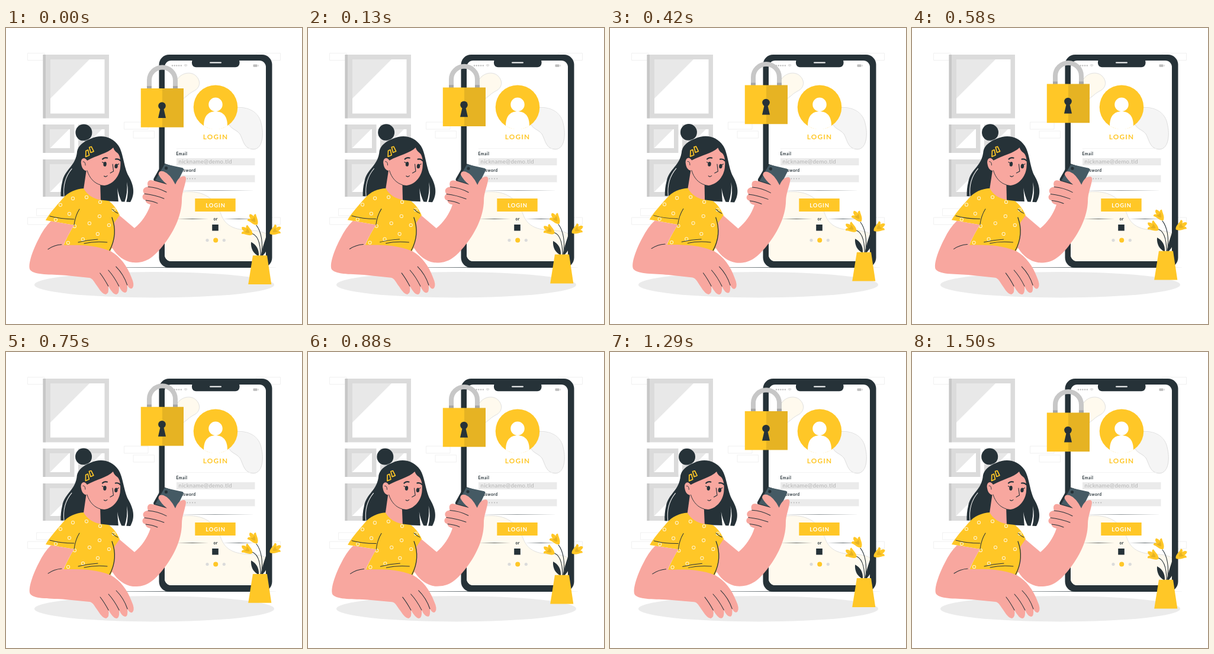
An HTML page with a canvas that plays this animation: 500 by 500 pixels, repeating every 1.54 s.

```html
<!DOCTYPE html>
<html lang="en">
<head>
<meta charset="utf-8">
<title>Login illustration</title>
<style>
  html, body { margin: 0; width: 100%; height: 100%; overflow: hidden; background: #fff; }
  canvas { display: block; width: 500px; height: 500px; }
</style>
</head>
<body>
<canvas id="stage"></canvas>
<script>
const LOOP = 1540, LEAD = 40;
const DARK = '#263238', YELLOW = '#ffc727', SKIN = '#f8a79f', CREAM = '#fffaee';
const canvas = document.getElementById('stage');
const ctx = canvas.getContext('2d');
const density = window.devicePixelRatio || 1;
canvas.width = canvas.height = 500 * density;

function fill(color, path) {
  ctx.fillStyle = color;
  ctx.fill(new Path2D(path));
}

function line(color, width, path) {
  ctx.strokeStyle = color;
  ctx.lineWidth = width;
  ctx.lineCap = ctx.lineJoin = 'round';
  ctx.stroke(new Path2D(path));
}

function rect(color, x, y, w, h, r = 0) {
  ctx.fillStyle = color;
  ctx.beginPath();
  ctx.roundRect(x, y, w, h, r);
  ctx.fill();
}

function ellipse(color, x, y, rx, ry = rx, turn = 0) {
  ctx.fillStyle = color;
  ctx.beginPath();
  ctx.ellipse(x, y, rx, ry, turn, 0, 7);
  ctx.fill();
}

function text(str, x, y, font, color, spacing, align = 'left') {
  ctx.font = font + ' Lato, sans-serif';
  ctx.letterSpacing = spacing + 'px';
  ctx.textAlign = align;
  ctx.fillStyle = color;
  ctx.fillText(str, x, y);
}

// A rule that thins out towards both ends
function rule(x1, x2, y) {
  const mid = (x1 + x2) / 2;
  fill(DARK, `M${x1} ${y}L${mid} ${y - .35}L${x2} ${y}L${mid} ${y + .35}Z`);
}

function brick(x, y, w) {
  ctx.strokeStyle = '#ededed';
  ctx.lineWidth = .8;
  ctx.strokeRect(x, y, w, 12);
}

function pane(x, y, w, h, left, glare) {
  rect('#dbdbdb', x, y, w, h);
  rect('#c7c7c7', x, y, left - 8, h);
  const ix = x + left, iy = y + 8;
  rect('#fff', ix, iy, w - left - 7.5, h - 16);
  fill('#e8e8e8', `M${ix} ${iy}h${glare}L${ix} ${iy + glare}Z`);
}

function drawRoom() {
  brick(37, 42.5, 28);
  brick(200, 159, 40);
  brick(215.5, 174, 35);
  brick(423, 42.5, 40.5);
  brick(52, 305, 40);
  brick(37, 320, 40);
  brick(430, 320, 33.5);
  pane(62.5, 45, 111.5, 107.5, 12.5, 66);
  pane(62.5, 163, 53, 48, 12, 32);
  pane(122, 163, 52, 48, 8, 32);
  pane(62.5, 222, 111.5, 63, 12, 47);
  ellipse('#ebebeb', 250.5, 433.8, 202.5, 21.7);
  rule(100, 462, 404.6);
}

function drawScreen() {
  fill(CREAM, 'M288 88C294 76 312 73 321 81C330 90 328 102 316 107C308 111 302 119 294 122L270 118Z');
  line('#d2d2d2', .7, 'M290 86C297 75 313 73 321 81C330 90 328 102 316 107C308 111 303 119 294 122');
  fill('#f5f5f5', 'M388 137C402 132 424 140 430 158C436 176 435 204 418 205C401 204 401 189 395 179C389 171 377 170 376 160Z');
  line('#cfcfcf', .7, 'M388 135C404 132 424 139 430 157C436 176 435 204 418 205C401 204 401 189 395 179C389 171 377 170 376 160');
  const hill = 'M266 290C282 277 305 274 324 278C347 283 357 299 363 314C369 331 381 339 402 341C418 342 432 342 442 349';
  fill(CREAM, hill + 'V396H266Z');
  line('#d6d6d6', .7, hill);

  ellipse(YELLOW, 354, 133.7, 37.3);
  ellipse('#fff', 354, 129.3, 11.7);
  fill('#fff', 'M334 165.5C334 149 341 141 354 141C367 141 374 149 374 165.5Q354 177 334 165.5Z');
  text('LOGIN', 354, 188.2, 'bold 11.8px', YELLOW, 1.2, 'center');

  rect('#f1f1f1', 288, 203, 132, .8);
  text('Email', 287.5, 215, 'bold 6.8px', DARK, .5);
  text('Password', 287.5, 243.3, 'bold 6.8px', DARK, .5);
  rect('#ebebeb', 288, 220, 132.5, 12);
  rect('#ebebeb', 288, 248.5, 132.5, 12);
  text('nickname@demo.tld', 291.5, 229.3, '9.5px', '#b3b3b3', .35);
  for (let i = 0; i < 7; i++) ellipse('#b3b3b3', 293.5 + i * 4.3, 254.5, .9);
  rule(286, 420, 274.5);

  rect(YELLOW, 319.3, 288, 68.4, 22);
  text('LOGIN', 354, 302.5, 'bold 9.4px', '#fff', .9, 'center');
  rule(288, 342, 322.6);
  rule(367, 420, 322.6);
  text('or', 354, 324.8, 'bold 6.8px', DARK, .4, 'center');
  rect(DARK, 348.2, 332, 10.6, 10.6);
  ellipse('#dbdbdb', 340, 358.5, 2.6);
  ellipse(YELLOW, 354.2, 358.5, 4);
  ellipse('#dbdbdb', 368.3, 358.5, 2.6);
}

function drawPhone() {
  rect(DARK, 258.5, 45, 191, 360, 17);
  ctx.save();
  ctx.beginPath();
  ctx.roundRect(268, 55, 171, 339, 11);
  ctx.clip();
  rect('#fff', 266, 53, 178, 345);
  drawScreen();
  ctx.restore();
  rect(DARK, 314, 50, 80.5, 16.3, 7);
  line('#fff', 2, 'M345 58.5H363');
  for (let i = 0; i < 5; i++) ellipse('#bdbdbd', 281 + i * 3.7, 63.5, 1.2);
  line('#bdbdbd', .9, 'M301 62.8Q303.5 60.4 306 62.8M302.2 64.3Q303.5 63 304.8 64.3');
  rect('#bdbdbd', 417.5, 61.5, 7, 4.2, 1);
  rect('#dbdbdb', 425.5, 62, 1.6, 3);
}

function drawLock() {
  line('#c7c7c7', 8, 'M242 98V89A22 22 0 0 1 286 89V98');
  rect('#a6a6a6', 238, 98.5, 8, 5);
  rect('#a6a6a6', 282, 98.5, 8, 5);
  rect(YELLOW, 227.8, 102.6, 36.2, 65.6);
  rect('#e6b323', 264, 102.6, 36, 65.6);
  ellipse(DARK, 263.5, 132, 6.3);
  fill(DARK, 'M261 135H266L270 152.5H257Z');
}

function flower(x, y, turn) {
  ctx.save();
  ctx.translate(x, y);
  ctx.rotate(turn);
  fill(YELLOW, 'M0 10C-6 7-5 0-9-6Q-6-9-3-5Q-3-11 1-12Q4-9 3.5-5Q6-8 9-6C6 0 6 7 0 10Z');
  fill('#e6b323', 'M-4-4Q0-1 4-4Q3 2 0 4Q-3 2-4-4Z');
  ctx.restore();
}

function drawVase() {
  line(DARK, 1.1, 'M431 386C435 364 431 344 423 334M430 386C430 364 426 349 413 347M433 386C434 366 441 357 447 347');
  fill(DARK, 'M414 362C422 366 428 374 427 386C418 382 413 373 414 362Z');
  fill(DARK, 'M441 346C443 361 440 376 434 385C430 374 437 365 441 346Z');
  fill(DARK, 'M441 366C442 376 437 383 431 386Q432 374 441 366Z');
  flower(418.5, 325, -.65);
  flower(408, 344, -1);
  flower(454, 343, 1);
  fill(YELLOW, 'M417 384.7H441L448.3 433.6H409.2Z');
}

function drawHead() {
  ellipse(DARK, 131.2, 176.7, 14, 14.2);
  line('#fff', .5, 'M121 189Q133 194 144 185');
  fill(DARK, 'M120 208C118 234 99 238 95 260Q92 272 92.5 284.5L125 286L160 292L187 293L210 294C219 279 215 264 207 250C199 236 198 211 190 199C179 183 160 179 143 187C130 192 122 199 120 208Z');
  fill('#fff', 'M188 270Q190 283 196 295L190 295Q189 283 188 270ZM204 260Q208 277 203 295L200 295Q206 278 204 260Z');
  line('#fff', 1, 'M111 238C100 251 96 267 98 285');
  fill(SKIN, 'M136 238L131 272L142 290L160 292L159 260Z');
  fill(SKIN, 'M181 202C171 212 153 215 137 224C132 216 125 221 127 230C128 238 133 242 137 241C141 255 151 265 166 266C182 264 192 249 193 235C194 226 193 215 188 211Q183 208 181 202Z');
  line(DARK, .9, 'M137 241C141 254 149 262 159 265M130 226Q134 225 134 232');
  line(DARK, 2.2, 'M163 221.5Q166 218 171 219.5M185 221.5Q190 220.5 193 224');
  ellipse(DARK, 167, 230, 2.7, 3.9, .1);
  ellipse(DARK, 186, 233.3, 2.7, 3.8, .1);
  line(DARK, 1.1, 'M165 228L162.5 226.5M188 231L190.5 229.5M180 230L181.5 242L176 245M165.5 250Q168.5 252.5 171 249.5');
  line(YELLOW, 1.7, 'M134.8 207.5L138.3 206L140.5 215L134.5 217.5ZM140.5 201.5L144 200.5L148 208.5L143 210.5Z');
}

function drawHeldPhone() {
  fill(DARK, 'M263 230Q265 227.5 269 229L290 236L275 268L250 258Q248.5 256 249.5 254Z');
  fill('#455a64', 'M268 229.5L298 236Q301 237.5 299.5 240L286 267L252 257Z');
  ellipse(DARK, 270.5, 236.5, 2.6);
}

function drawRightArm() {
  fill(SKIN, 'M217 338C229 328 239 314 244 298C239 297 235 294 236 291C229 290 229 282 234 280C229 275 232 268 240 268C237 260 241 256 246 257L251 258L272 264Q262 256 257.5 247Q258 240 266 242Q277 246 286 264Q289 256 294 252Q304 247 304 255C302 268 297 278 297 290C297 318 282 347 264 369C246 391 234 397 214 396C200 394 188 385 180 372L174 374L181 325L191 316Z');
  line(DARK, 1, 'M240 268Q256 269 271 277M234 280Q251 282 267 288M236 291Q247 292 256 296');
}

function drawShirt() {
  fill(YELLOW, 'M131 271C118 272 105 277 96 288C84 302 73 314 67 325L115 333C107 346 101 358 97 368L176 378C184 360 185 343 183 329L192 316C187 305 180 296 173 292L160 290.5Q140 287 131 271Z');
  ctx.strokeStyle = '#fff5d3';
  ctx.lineWidth = 1;
  const rings = [113,288, 136,286, 159,294, 182,307, 92,299, 84,324, 107,314, 116,335,
    141,330, 158,318, 174,333, 155,348, 130,357, 105,363];
  for (let i = 0; i < rings.length; i += 2) {
    ctx.beginPath();
    ctx.arc(rings[i], rings[i + 1], 2.6, 0, 7);
    ctx.stroke();
  }
  line(DARK, 1, 'M124 306Q117 317 115 333M74 318Q92 323 115 323M122 362Q138 358 155 357M132 364Q150 360 171 362M179 306Q184 311 189 313');
  line(DARK, 1.3, 'M179 320C186 339 184 359 175 376');
}

function drawLeftArm() {
  fill(SKIN, 'M76 326.5L115 333C107 346 101 358 97 367C119 367 148 365 177 377C193 386 205 402 212 421Q218 434 214 439Q210 443 205 434Q206 448 201 447Q196 447 191 436Q192 450 186 450Q181 450 173 436Q175 448 169 450Q163 450 155 437C149 429 147 423 141 422L100 418C76 416 49 418 41 409C36 401 46 374 55 357Q64 338 76 326.5Z');
  line(DARK, 1, 'M71 374Q81 367 94 366M159 414Q166 423 173 436M173 409Q183 420 191 436M186 403Q199 416 205 434');
}

function drawWoman() {
  drawHead();
  drawHeldPhone();
  drawRightArm();
  drawShirt();
  drawLeftArm();
}

function moved(dy, draw) {
  ctx.save();
  ctx.translate(0, dy);
  draw();
  ctx.restore();
}

function turned(degrees, x, y, draw) {
  ctx.save();
  ctx.translate(x, y);
  ctx.rotate(degrees * Math.PI / 180);
  ctx.translate(-x, -y);
  draw();
  ctx.restore();
}

// Linear zigzag: 0 at the ends, 1 halfway
const zigzag = p => 1 - Math.abs(1 - 2 * (p % 1));

function render(now) {
  const phase = ((now + LEAD) % LOOP) / LOOP;
  const lift = -10 * zigzag(phase);
  const sway = 2 * zigzag(phase + .25) - 1;
  ctx.setTransform(density, 0, 0, density, 0, 0);
  rect('#fff', 0, 0, 500, 500);
  drawRoom();
  drawPhone();
  moved(lift, drawLock);
  turned(sway, 171, 300, drawWoman);
  moved(lift, drawVase);
  requestAnimationFrame(render);
}
render(performance.now());
</script>
</body>
</html>
```
